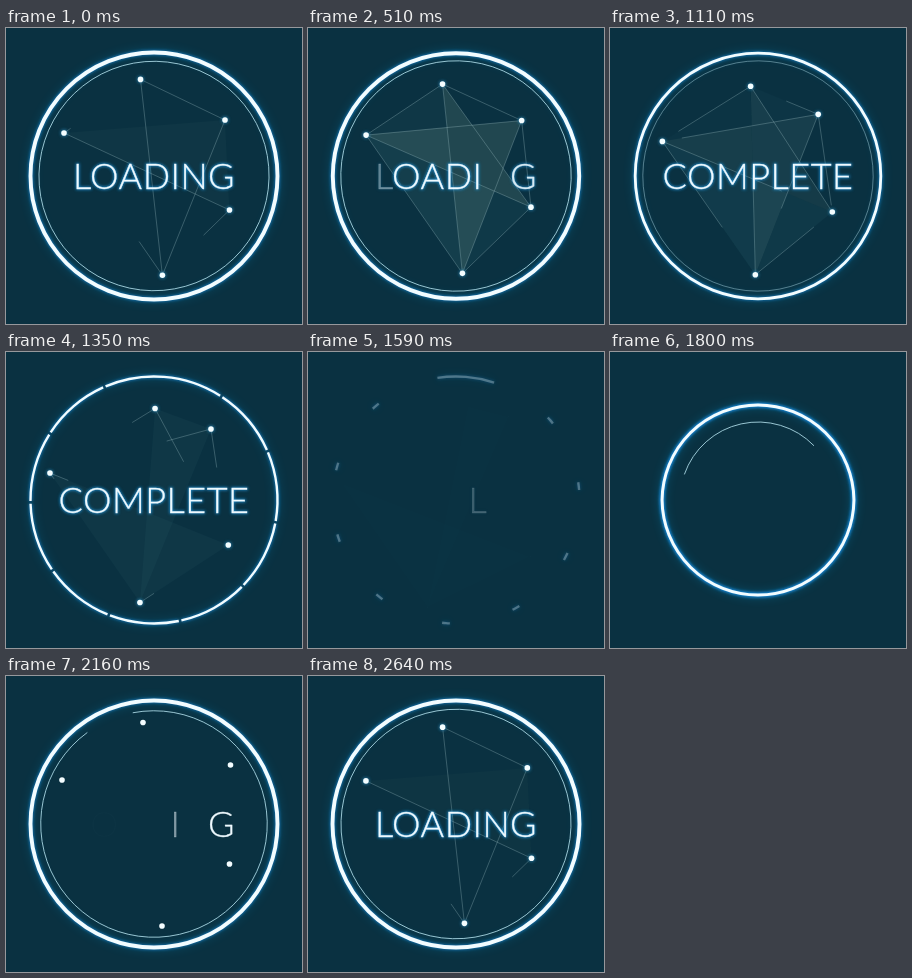
Animation, 296 px wide and 296 px high, one loop 2.67 s. Source, as an HTML page:

```html
<!DOCTYPE html>
<html lang="en">
<head>
<meta charset="utf-8">
<title>Loading</title>
<style>
  html, body { margin: 0; width: 100%; height: 100%; overflow: hidden; background: #0a3141; }
  svg { display: block; width: 100vw; height: 100vh; }
  text { font: 300 36px Lato, "Open Sans", sans-serif; letter-spacing: .5px; text-anchor: middle; }
  path { fill: none; }
</style>
</head>
<body>
<svg viewBox="0 0 296 296">
  <defs>
    <filter id="wide" filterUnits="userSpaceOnUse" x="0" y="0" width="296" height="296"><feGaussianBlur stdDeviation="5"/></filter>
    <filter id="near" filterUnits="userSpaceOnUse" x="0" y="0" width="296" height="296"><feGaussianBlur stdDeviation="1.6"/></filter>
  </defs>
  <rect width="296" height="296" fill="#0a3141"/>
  <g id="fills"></g>
  <g id="lines" stroke="#b4d4d6" stroke-width=".7" stroke-opacity=".4"></g>
  <g id="rings"></g>
  <g id="halos" fill="#2f9fd8" filter="url(#near)"></g>
  <g id="dots" fill="#f4fdff"></g>
  <g id="glow" fill="#1c9ae6" stroke="#1c9ae6" stroke-width="1.6" filter="url(#near)"></g>
  <g id="words" fill="#effaff" stroke="#effaff" stroke-width=".35"></g>
</svg>
<script>
// Time runs from START to START + LOOP, so one cycle is a single rise and fall.
const LOOP = 2670, START = 1620, C = 148;
const clamp = v => Math.max(0, Math.min(1, v));
const ramp = (t, from, dur) => clamp((t - from) / dur);

function set(el, attrs) {
  for (const k in attrs) el.setAttribute(k, attrs[k]);
}
function add(parent, tag, attrs = {}) {
  const el = document.createElementNS("http://www.w3.org/2000/svg", tag);
  set(el, attrs);
  (parent.append ? parent : document.getElementById(parent)).append(el);
  return el;
}

// Each node curves from start past bend to rest, then gets a last push.
const nodes = {
  A: { start: [137, 46.5], bend: [134.5, 51.4], rest: [136, 59.3], push: [13, -2.8] },
  B: { start: [224.5, 89], bend: [219, 92], rest: [210, 91.5], push: [-5, -14.5] },
  C: { start: [56, 104], bend: [58, 105], rest: [57, 109.2], push: [-13, 11.8] },
  D: { start: [223.5, 188], bend: [223.5, 182], rest: [222.3, 179], push: [0, 14] },
  E: { start: [156, 250], bend: [156.4, 247.2], rest: [151.6, 244.6], push: [-17.6, 5.9] }
};
const BEND = 510 / 1380;

function place({ start, bend, rest, push }, t) {
  const u = Math.min(1, (t - 2160) / 1380);
  const kick = Math.max(0, (t - 3540) / 480) ** 1.5;
  return [0, 1].map(k => {
    const span = rest[k] - start[k];
    const curve = (bend[k] - start[k] - span * BEND) / (BEND * (BEND - 1));
    return start[k] + span * u + curve * u * (u - 1) + push[k] * kick;
  });
}

const dots = Object.keys(nodes).map(id => ({
  id, halo: add("halos", "circle"), core: add("dots", "circle")
}));

// Edges grow from their first node in one order and drain from it in another.
const drain = "AB AE EB EC DC DE CA CB DB DA".split(" ");
const lines = "AB AE EB DC DE EC CA CB DB DA".split(" ").map((ends, i) => ({
  ends,
  head: 2200 + 45 * i + (i > 3 ? 175 : 0),
  tail: 3570 + 23 * drain.indexOf(ends),
  el: add("lines", "line")
}));

const OLIVE = "#94b49c", TEAL = "#78bec8";
const fills = [
  { ends: "CBD", fill: OLIVE, peak: .06, rise: 2480, fall: 2760 },
  { ends: "CBEAD", fill: OLIVE, peak: .17, rise: 2760, fall: 3600 },
  { ends: "ACE", fill: TEAL, peak: .04, rise: 2800, fall: 3600 },
  { ends: "CDE", fill: TEAL, peak: .05, rise: 2800, fall: 3960 },
  { ends: "ABE", fill: TEAL, peak: .05, rise: 3600, fall: 3960 }
].map(f => ({ ...f, el: add("fills", "polygon", { fill: f.fill }) }));

// Letters fade one by one, in the order of the digits.
function word(chars, rise, fall) {
  const texts = ["glow", "words"].map(g => add(g, "text", { x: C, y: 161 }));
  const when = (f, i) => f.at + f.step * f.order.indexOf(i);
  return [...chars].map((ch, i) => {
    const [glow, face] = texts.map(text => {
      const el = add(text, "tspan");
      el.textContent = ch;
      return el;
    });
    return { glow, face, rise: when(rise, i), fall: when(fall, i) };
  });
}
const letters = [
  ...word("LOADING", { at: 2070, step: 45, order: "6413052" }, { at: 3081, step: 45, order: "5063142" }),
  ...word("COMPLETE", { at: 3275, step: 45, order: "32175046" }, { at: 4050, step: 20, order: "25036714" })
];

const wide = add("rings", "path", { stroke: "#0f86b8", filter: "url(#wide)" });
const near = add("rings", "path", { stroke: "#1590e6", filter: "url(#near)" });
const core = add("rings", "path", { stroke: "#f2fcff" });
const inner = add("rings", "path", { stroke: "#a9d6e2", "stroke-width": .9 });

function arc(r, from, to) {
  if (to <= from || r <= 0) return "";
  const at = deg => {
    const a = deg * Math.PI / 180;
    return (C + r * Math.cos(a)).toFixed(2) + " " + (C + r * Math.sin(a)).toFixed(2);
  };
  const step = `A${r} ${r} 0 0 1 `;
  return `M${at(from)}${step}${at((from + to) / 2)}${step}${at(to)}`;
}

function dashes(r, gap) {
  const count = 10, size = 33.7, first = 303;
  let d = "";
  for (let i = 0; i < count; i++) {
    const from = first + size * i, to = i < count - 1 ? from + size : first + 360;
    d += arc(r, from + gap / 2, to - gap / 2);
  }
  return d;
}

function drawRings(t) {
  const grow = 1 - (1 - ramp(t, START, 460)) ** 3;
  const r = grow * (123.5 - Math.sin(Math.PI * ramp(t, 3100, 900)));
  const split = ramp(t, 3960, 320);
  const d = split ? dashes(r, 34 * split * split) : arc(r, 0, 360);
  const width = 3 * ramp(t, START - 60, 200) + .9 * ramp(t, 1800, 300) - 1.5 * ramp(t, 3180, 840);
  const flare = 1 - ramp(t, 1800, 360);
  const fade = 1 - ramp(t, 4190, 100);
  set(core, { d, "stroke-width": width, opacity: fade });
  set(near, { d, "stroke-width": width + 1.2 + flare, opacity: fade * (.65 + .3 * flare) });
  set(wide, { d, "stroke-width": width + 3, opacity: fade * (.25 + .1 * flare) });

  const age = Math.max(0, t - 1663);
  const sweep = 360 * (1 - (1 - ramp(t, 1663, 600)) ** 1.5);
  const from = 199 + (t - 1800) / 6;
  set(inner, {
    d: arc(115.2 * (1 - Math.exp(-age * .00818)), from, from + sweep),
    opacity: 1 - ramp(t, 3650, 280)
  });
}

function draw(ms) {
  const now = ms % LOOP, t = now < START ? now + LOOP : now;
  const at = {};
  for (const id in nodes) at[id] = place(nodes[id], t);

  drawRings(t);

  for (const f of fills) set(f.el, {
    points: [...f.ends].map(id => at[id].join()).join(" "),
    opacity: f.peak * ramp(t, f.rise, 330) * (1 - ramp(t, f.fall, 330))
  });

  for (const l of lines) {
    const [a, b] = [...l.ends].map(id => at[id]);
    const head = ramp(t, l.head, 300), tail = ramp(t, l.tail, 400);
    const mix = (k, u) => a[k] + (b[k] - a[k]) * u;
    set(l.el, {
      x1: mix(0, tail), y1: mix(1, tail), x2: mix(0, head), y2: mix(1, head),
      visibility: head > tail ? "visible" : "hidden"
    });
  }

  const shown = ramp(t, 2050, 80) * (1 - ramp(t, 4160, 110));
  const lit = ramp(t, 2160, 400);
  for (const p of dots) {
    const [cx, cy] = at[p.id];
    set(p.core, { cx, cy, r: 2.8 * shown, opacity: shown });
    set(p.halo, { cx, cy, r: 3.4 * shown, opacity: .6 * shown * lit });
  }

  for (const l of letters) {
    const o = ramp(t, l.rise, 90) * (1 - ramp(t, l.fall, 90));
    const shine = .7 * o * o * lit;
    set(l.face, { "fill-opacity": o, "stroke-opacity": o });
    set(l.glow, { "fill-opacity": shine, "stroke-opacity": shine });
  }
}

function tick() {
  draw(performance.now());
  requestAnimationFrame(tick);
}
tick();
</script>
</body>
</html>
```
